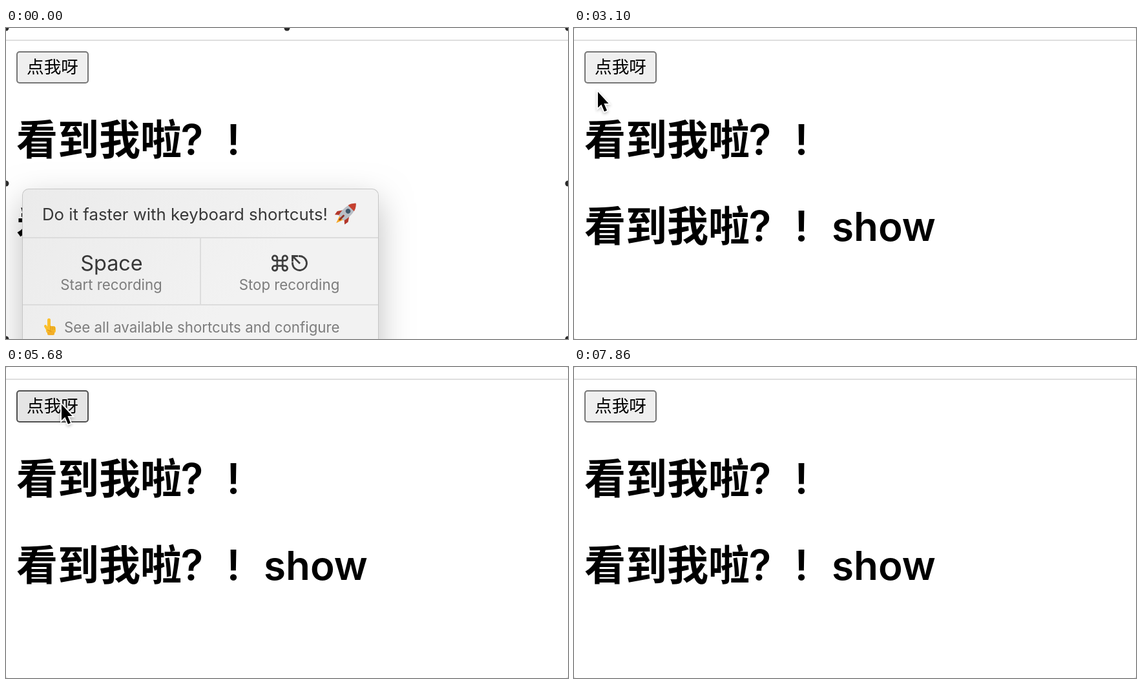
Write an HTML page with a canvas that moves like this. It is 870 by 482 pixels and loops after 9460 ms.

```html
<!DOCTYPE html>
<html lang="zh-CN">
<head>
<meta charset="utf-8">
<style>
html, body { margin: 0; width: 100%; height: 100%; overflow: hidden; background: #fff; }
canvas { display: block; }
</style>
</head>
<body>
<canvas id="stage" width="870" height="482"></canvas>
<script>
const W = 870, H = 482, LOOP = 9460;
const ctx = document.getElementById('stage').getContext('2d');
const LATIN = 'Inter, Roboto, sans-serif';
const HAN = '"Noto Sans CJK SC", "Noto Sans CJK", "Noto Sans SC", sans-serif';

const CLICKS = [4080, 5000, 6080, 6940];
const RIPPLE = 680, PRESS = 120;

// Pointer waypoints: time, x, y
const PATH = [
  [800, 336, 470], [920, 139, 332], [1400, 139, 332], [1500, 219, 198.5],
  [2060, 219, 198.5], [2920, 33, 110], [3020, 33, 110], [3100, 37, 99],
  [3300, 62, 56], [3460, 44, 17], [3620, 11, 42], [3760, 44, 66],
  [3960, 82, 54], [4600, 82, 54], [4860, 86, 58], [6060, 86, 58],
  [6400, 88, 57], [7640, 88, 57], [7860, 320, 443]
];

function pointerAt(t) {
  if (t < PATH[0][0] || t >= PATH[PATH.length - 1][0]) return null;
  const i = PATH.findIndex(p => p[0] > t);
  const [t0, x0, y0] = PATH[i - 1], [t1, x1, y1] = PATH[i];
  const u = (t - t0) / (t1 - t0), e = u * u * (3 - 2 * u);
  return { x: x0 + (x1 - x0) * e, y: y0 + (y1 - y0) * e };
}

function text(str, x, y, font, color, align = 'left') {
  ctx.font = font;
  ctx.fillStyle = color;
  ctx.textAlign = align;
  ctx.fillText(str, x, y);
}

function dot(x, y, r, color) {
  ctx.fillStyle = color;
  ctx.beginPath();
  ctx.arc(x, y, r, 0, Math.PI * 2);
  ctx.fill();
}

function box(x, y, w, h, r, color) {
  ctx.fillStyle = color;
  ctx.beginPath();
  ctx.roundRect(x, y, w, h, r);
  ctx.fill();
}

function poly(points, color) {
  ctx.fillStyle = color;
  ctx.beginPath();
  points.forEach(([x, y]) => ctx.lineTo(x, y));
  ctx.closePath();
  ctx.fill();
}

function heading(y, tail) {
  text('看到我啦', 16, y, 'bold 64px ' + HAN, '#000');
  const font = '600 64px ' + LATIN;
  text('?', 288, y, font, '#000', 'center');
  text('!', 352, y, font, '#000', 'center');
  text(tail, 399, y, '600 62px ' + LATIN, '#000');
}

function button(state) {
  const [edge, fill] = {
    idle: ['#767676', '#efefef'],
    hover: ['#4f4f4f', '#e5e5e5'],
    active: ['#8d8d8d', '#f5f5f5']
  }[state];
  box(16, 36, 112, 50, 5, edge);
  box(18, 38, 108, 46, 3, fill);
  text('点我呀', 32, 70, '26.67px ' + HAN, '#000');
}

function ripple(x, y, r) {
  ctx.save();
  ctx.globalCompositeOperation = 'multiply';
  dot(x, y, r, 'rgb(255,113,125)');
  ctx.globalCompositeOperation = 'screen';
  dot(x, y, r, 'rgb(222,30,0)');
  ctx.restore();
}

function pointer(x, y) {
  ctx.save();
  ctx.translate(x, y);
  const shape = new Path2D('M0 0V24.5L5.4 19.4L10 30.5L14 28.8L9.4 18H16.5Z');
  ctx.lineWidth = 3.6;
  ctx.strokeStyle = '#fff';
  ctx.shadowColor = 'rgba(0,0,0,.25)';
  ctx.shadowBlur = 4;
  ctx.shadowOffsetY = 2;
  ctx.stroke(shape);
  ctx.shadowColor = 'transparent';
  ctx.fillStyle = '#000';
  ctx.fill(shape);
  ctx.restore();
}

function rocket() {
  ctx.save();
  ctx.translate(526.5, 287);
  ctx.rotate(Math.PI / 4);
  ctx.scale(1.08, 1.08);
  poly([[-4, 9], [0, 20], [4, 9]], '#f5a623');
  poly([[-5, -2], [-11, 7], [-10, 13], [-4, 8]], '#b3372b');
  poly([[5, -2], [11, 7], [10, 13], [4, 8]], '#b3372b');
  ctx.fillStyle = '#b9bec6';
  ctx.fill(new Path2D('M0 -20C8 -13 8 2 5 10H-5C-8 2 -8 -13 0 -20Z'));
  ctx.fillStyle = '#c5402f';
  ctx.fill(new Path2D('M0 -20C4 -16 5.5 -13 6 -10H-6C-5.5 -13 -4 -16 0 -20Z'));
  dot(0, -4, 3.4, '#42586c');
  box(-1.3, 4, 2.6, 10, 1, '#8f3028');
  ctx.restore();
}

// Raised index finger, the other fingers folded to its right
function hand() {
  box(64, 450, 5, 18, 2.5, '#fbc02d');
  box(62, 462, 15, 11, 4, '#fbc02d');
  box(64, 469, 11, 7, 2, '#f3ae27');
  ctx.strokeStyle = '#fbc02d';
  ctx.lineWidth = 4;
  ctx.lineCap = 'round';
  ctx.stroke(new Path2D('M61 462L65 469'));
  ctx.strokeStyle = '#d48b15';
  ctx.lineWidth = 1;
  ctx.stroke(new Path2D('M69 462V468M71.7 463V468M74.4 463V468M64 468L70 470'));
  ctx.lineCap = 'butt';
}

function keys() {
  ctx.strokeStyle = '#3f3f3f';
  ctx.lineWidth = 2.8;
  ctx.lineJoin = 'miter';
  for (const sx of [-1, 1]) for (const sy of [-1, 1]) {
    ctx.save();
    ctx.translate(424, 364.5);
    ctx.scale(sx, sy);
    ctx.stroke(new Path2D('M0 4.2H7.4A3.7 3.7 0 1 1 4.2 7.4V0'));
    ctx.restore();
  }
  ctx.beginPath();
  ctx.arc(454.5, 364.5, 11, -Math.PI * 0.55, Math.PI * 1.05);
  ctx.stroke();
  ctx.stroke(new Path2D('M455 365L444 354M443.5 362V353.5H452'));
}

function popup() {
  ctx.save();
  ctx.shadowColor = 'rgba(0,0,0,.25)';
  ctx.shadowBlur = 50;
  ctx.shadowOffsetY = 18;
  box(25, 249, 552, 290, 10, '#c6c6c6');
  ctx.restore();
  const fill = ctx.createLinearGradient(26, 250, 300, 482);
  fill.addColorStop(0, '#ebebeb');
  fill.addColorStop(1, '#f2f2f2');
  box(26, 250, 550, 290, 9, fill);
  ctx.fillStyle = '#dcdcdc';
  ctx.fillRect(26, 324, 550, 2);
  ctx.fillRect(26, 428, 550, 2);
  ctx.fillRect(300, 326, 2, 102);

  const small = '22.3px ' + LATIN, gray = '#7c7c7c';
  text('Do it faster with keyboard shortcuts!', 56, 298, '25.8px ' + LATIN, '#383838');
  text('Space', 163.5, 376, '32.4px ' + LATIN, '#383838', 'center');
  text('Start recording', 163, 406, small, gray, 'center');
  text('Stop recording', 438.5, 406, small, gray, 'center');
  text('See all available shortcuts and configure', 90, 472, small, gray);
  rocket();
  keys();
  hand();
}

function draw(t) {
  ctx.fillStyle = '#dedede';
  ctx.fillRect(0, 0, W, H);
  box(0, 0, W, H, 4, '#fff');
  ctx.fillStyle = '#dedede';
  ctx.fillRect(0, 18, W, 2);

  const pos = pointerAt(t);
  const over = pos && pos.x > 16 && pos.x < 128 && pos.y > 36 && pos.y < 86;
  const pressed = CLICKS.some(c => t >= c && t < c + PRESS);
  button(pressed ? 'active' : over ? 'hover' : 'idle');

  const toggles = CLICKS.filter(c => t >= c + PRESS).length;
  if (toggles % 2 === 0) {
    heading(196, '');
    heading(330, 'show');
  }

  if (t < 40) {
    popup();
    for (const x of [0, W / 2, W]) for (const y of [0, H / 2, H]) {
      const inside = x === W / 2 && y > 0;
      if (!inside) dot(x, y, 4.5, '#2b2b2b');
    }
  }

  const click = CLICKS.find(c => t >= c && t < c + RIPPLE);
  if (click !== undefined) ripple(pos.x, pos.y, 50 * (1 - (t - click) / RIPPLE));
  if (pos) pointer(pos.x, pos.y);
}

const start = performance.now();
function tick() {
  draw((performance.now() - start) % LOOP);
  requestAnimationFrame(tick);
}
tick();
</script>
</body>
</html>
```
